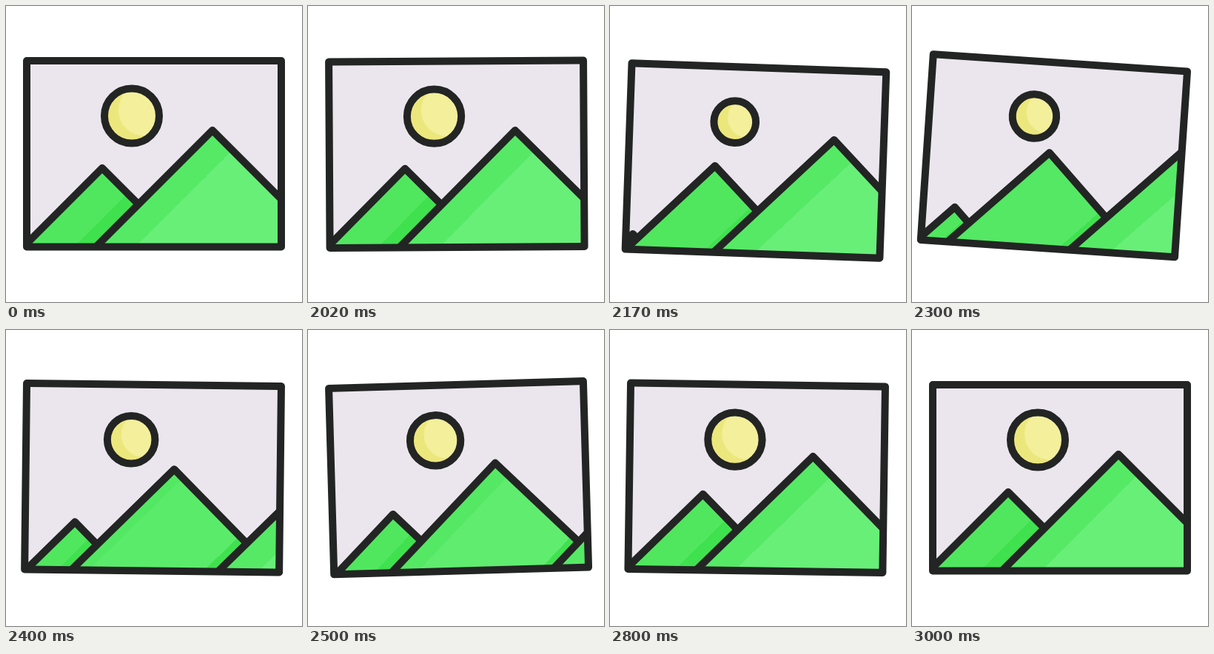
An HTML page with a canvas that plays this animation: 400 px wide and 400 px high, repeating every 3.02 s.

```html
<!DOCTYPE html>
<html lang="en">
<head>
<meta charset="utf-8">
<title>Swinging picture</title>
<style>
html, body { margin: 0; height: 100%; overflow: hidden; background: #fff; }
canvas { display: block; width: 100vmin; height: 100vmin; }
</style>
</head>
<body>
<canvas width="400" height="400"></canvas>
<script>
const LOOP = 3020, HOLD = 2020, START = 2000;
const INK = '#232424', SKY = '#ebe6ed';
const SMALL = [80, 231, 95], LARGE = [104, 239, 120];
const EDGE = [78, 230, 93], SHADE = [86, 233, 102], DARK = '#40e14f';
const BOX = [28, 74, 344, 251.5];
// [time, value] keys: tilt in degrees, fall in pixels
const SWING = [[0, 0], [75, -1.8], [245, 4.6], [510, -1.65], [740, 0.95], [1000, 0]];
const DROP = [[0, 0], [150, 9.5], [385, 0]];
const ctx = document.querySelector('canvas').getContext('2d');

const clamp = x => Math.min(1, Math.max(0, x));
const smooth = x => x * x * (3 - 2 * x);
const lerp = (a, b, k) => a + (b - a) * k;
const mix = (a, b, k) => `rgb(${a.map((v, i) => Math.round(lerp(v, b[i], k)))})`;
const rgb = c => `rgb(${c})`;

// cubic-bezier(x1, 0, x2, 1)
function ease(x, x1, x2) {
  let lo = 0, hi = 1;
  for (let i = 0; i < 24; i++) {
    const s = (lo + hi) / 2, r = 1 - s;
    if (3 * r * r * s * x1 + 3 * r * s * s * x2 + s * s * s < x) lo = s; else hi = s;
  }
  return smooth(lo);
}

// Smooth interpolation through keys
function track(keys, t) {
  const i = keys.findIndex(k => k[0] > t);
  if (i < 0) return keys[keys.length - 1][1];
  const [t0, a] = keys[i - 1], [t1, b] = keys[i];
  return lerp(a, b, smooth((t - t0) / (t1 - t0)));
}

// Three diagonal bands: edge up to `near`, body up to `far`, then dark
function mountain(x, y, near, far, edge, body) {
  const span = 400, h = 345 - y;
  const fill = ctx.createLinearGradient(x, y, x + span / 2, y + span / 2);
  fill.addColorStop(0, edge);
  fill.addColorStop(near / span, edge);
  fill.addColorStop(near / span, body);
  fill.addColorStop(far / span, body);
  fill.addColorStop(far / span, DARK);
  fill.addColorStop(1, DARK);
  ctx.beginPath();
  ctx.moveTo(x - h, y + h);
  ctx.lineTo(x, y);
  ctx.lineTo(x + h, y + h);
  ctx.fillStyle = fill;
  ctx.fill();
  ctx.stroke();
}

function circle(x, y, r) {
  ctx.beginPath();
  ctx.arc(x, y, r, 0, 2 * Math.PI);
}

function sun(r) {
  const x = 170, y = 148.5, k = r / 37;
  ctx.save();
  circle(x, y, r);
  ctx.clip();
  ctx.fillStyle = '#ece77c';
  ctx.fill();
  circle(x + 17, y - 8 * k, 35 * k);
  ctx.fillStyle = '#f3ef9b';
  ctx.fill();
  ctx.restore();
  circle(x, y, r);
  ctx.stroke();
}

function draw(t) {
  const move = ease(t / 1000, 0.39, 0.15);
  const grow = ease(t / 1000, 0.19, 0.36);
  const r = t < 180
    ? lerp(37, 28.3, smooth(t / 180))
    : lerp(28.3, 37, ease(clamp((t - 180) / 820), 0.24, 0.2));
  const drop = track(DROP, t);

  ctx.fillStyle = '#fff';
  ctx.fillRect(0, 0, 400, 400);
  ctx.save();
  // Hangs from the middle of its top edge
  ctx.translate(200 + drop * 0.15, 74 + drop);
  ctx.rotate(track(SWING, t) * Math.PI / 180);
  ctx.translate(-200, -74);
  ctx.lineWidth = 10;
  ctx.lineJoin = 'round';
  ctx.strokeStyle = INK;

  ctx.save();
  ctx.beginPath();
  ctx.rect(...BOX);
  ctx.clip();
  ctx.fillStyle = SKY;
  ctx.fill();
  sun(r);
  // Each mountain moves on to the next one's place
  if (t > 0) mountain(27 + 103 * move, 326 - 107 * grow, 0, 68 * grow, rgb(SMALL), rgb(SMALL));
  mountain(130 + 149 * move, 219 - 51 * grow, 54 * move * move, 68 + 180 * grow,
    mix(EDGE, SHADE, move), mix(SMALL, LARGE, move * move));
  if (t < 1000) mountain(279 + 253 * move, 168, 54, 400, rgb(SHADE), rgb(LARGE));
  ctx.restore();

  ctx.strokeRect(...BOX);
  ctx.restore();
}

const begin = performance.now();
function tick() {
  const t = (performance.now() - begin) % LOOP;
  draw(t < HOLD ? 0 : Math.min(1000, t - START));
  requestAnimationFrame(tick);
}
tick();
</script>
</body>
</html>
```
